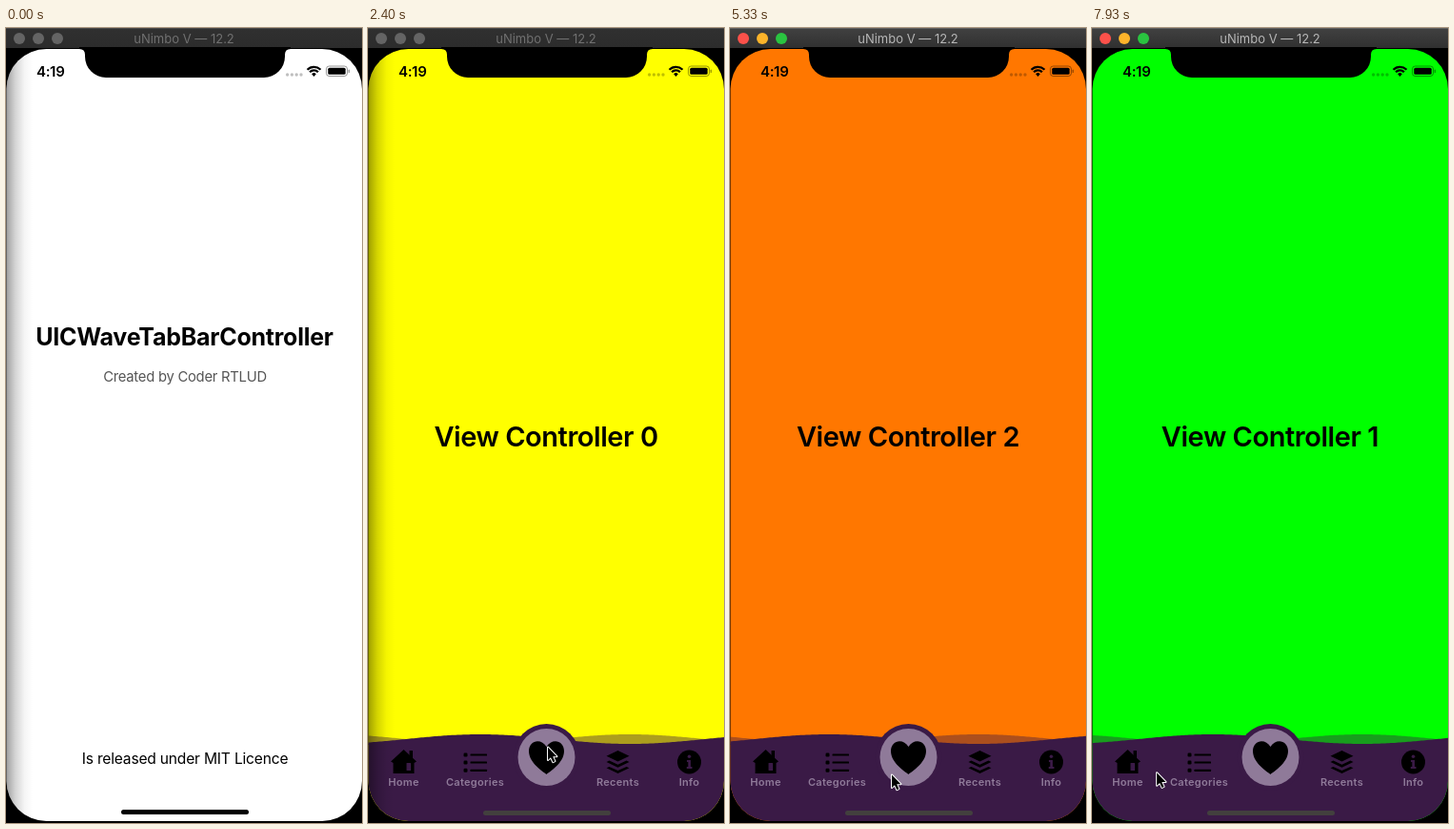
Animation of 374x834 px, one loop 8 s. Source, as an HTML page with a canvas:

```html
<!DOCTYPE html>
<html lang="en">
<head>
<meta charset="utf-8">
<title>Wave tab bar</title>
<style>
html, body { margin: 0; width: 100%; height: 100%; overflow: hidden; background: #000; }
canvas { display: block; width: 374px; height: 834px; }
</style>
</head>
<body>
<canvas id="stage"></canvas>
<script>
const W = 374, H = 834, LOOP = 8000;
const PURPLE = '#3a1a46', LILAC = '#8f7a99';
const PAGES = ['#ffff00', '#00ff00', '#ff7700', '#808080', '#8b5a2b'];
const FADE = [700, 1300], GROW = [1200, 2350], ACTIVE_AT = 2650;
// [time, page] for every tap on a tab
const TAPS = [[0, 0], [3450, 1], [4750, 2], [5800, 3], [6500, 4], [7170, 3], [7450, 2], [7700, 1]];
// [time, x, y] of the pointer tip
const POINTER = [
  [2000, 250, 840], [2400, 188, 753], [2700, 187, 754], [3330, 108, 772], [3600, 110, 774],
  [3930, 130, 774], [4500, 181, 772], [4900, 177, 777], [5330, 169, 782], [5700, 258, 780],
  [5900, 261, 779], [6400, 334, 778], [6600, 333, 779], [6930, 300, 782], [7170, 262, 781],
  [7450, 186, 778], [7700, 113, 778], [8000, 60, 780]
];

const canvas = document.getElementById('stage');
const ctx = canvas.getContext('2d');
const dpr = window.devicePixelRatio || 1;
canvas.width = W * dpr;
canvas.height = H * dpr;

const clamp = v => Math.max(0, Math.min(1, v));
const ease = v => v * v * (3 - 2 * v);
const span = (t, [a, b]) => clamp((t - a) / (b - a));

function text(str, x, y, size, weight, color, spacing = 0) {
  ctx.font = `${weight} ${size}px Inter, sans-serif`;
  ctx.letterSpacing = spacing + 'px';
  ctx.textAlign = 'center';
  ctx.textBaseline = 'alphabetic';
  ctx.fillStyle = color;
  ctx.fillText(str, x, y);
}

function disc(x, y, r, color) {
  ctx.fillStyle = color;
  ctx.beginPath();
  ctx.arc(x, y, r, 0, Math.PI * 2);
  ctx.fill();
}

function box(x, y, w, h, r, color) {
  ctx.fillStyle = color;
  ctx.beginPath();
  ctx.roundRect(x, y, w, h, r);
  ctx.fill();
}

function poly(points, color) {
  ctx.fillStyle = color;
  ctx.beginPath();
  points.forEach(([x, y]) => ctx.lineTo(x, y));
  ctx.closePath();
  ctx.fill();
}

function titleBar(active) {
  const g = ctx.createLinearGradient(0, 0, 0, 21);
  g.addColorStop(0, active ? '#414141' : '#303030');
  g.addColorStop(1, active ? '#303030' : '#2c2c2c');
  ctx.fillStyle = g;
  ctx.fillRect(0, 0, W, 21);
  ctx.fillStyle = active ? '#606060' : '#484848';
  ctx.fillRect(0, 0, W, 1);
  const lights = active ? ['#fc514a', '#fdb42a', '#2ac440'] : ['#646464', '#646464', '#646464'];
  lights.forEach((c, i) => disc(14 + 20 * i, 11, 6, c));
  text('uNimbo V — 12.2', 187, 16, 13, 400, active ? '#b6b6b6' : '#707070');
}

function splash() {
  ctx.fillStyle = '#fff';
  ctx.fillRect(0, 21, W, H);
  text('UICWaveTabBarController', 187.5, 333, 25, 700, '#000', -0.25);
  text('Created by Coder RTLUD', 188, 370.5, 14.8, 400, '#555', -0.25);
  text('Is released under MIT Licence', 188, 772, 15.6, 400, '#000', -0.2);
  box(121, 820, 134, 5, 2.5, '#000');
}

function wave(t, sign, color) {
  const amp = 5 * span(t, GROW);
  const crest = 118 - 0.112 * (t - 2400);
  ctx.fillStyle = color;
  ctx.beginPath();
  ctx.moveTo(0, 752);
  for (let x = 0; x <= W; x += 2) {
    ctx.lineTo(x, 751 - amp - sign * amp * Math.cos((x - crest) * 0.02));
  }
  ctx.lineTo(W, 752);
  ctx.fill();
}

function homeIcon() {
  poly([[37.5, 757], [51, 769.5], [48.5, 771], [48.5, 782], [26.5, 782], [26.5, 771], [24, 769.5]], '#000');
  box(43.5, 758, 3.5, 8, 0.5, '#000');
  box(40.5, 771, 4.5, 8, 0.5, PURPLE);
}

function listIcon() {
  for (const y of [762.5, 770.5, 778.8]) {
    box(100.5, y - 2, 4, 4, 1.2, '#000');
    box(107.5, y - 1.1, 17.5, 2.2, 0.5, '#000');
  }
}

function layersIcon() {
  poly([[262.5, 758], [274.5, 763.7], [262.5, 769.4], [250.5, 763.7]], '#000');
  for (const y of [770, 776.3]) {
    poly([[253.5, y - 1.4], [262.5, y + 2.8], [271.5, y - 1.4], [274.5, y],
          [262.5, y + 5.8], [250.5, y]], '#000');
  }
}

function infoIcon() {
  disc(337.5, 770, 12.5, '#000');
  disc(337.5, 764.3, 1.8, PURPLE);
  poly([[335, 768], [339, 768], [339, 775], [340.5, 775], [340.5, 777],
        [334.8, 777], [334.8, 775], [336.3, 775], [336.3, 770], [335, 770]], PURPLE);
}

function heartButton() {
  disc(187.5, 765, 35, PURPLE);
  disc(187.5, 765, 30, LILAC);
  ctx.fillStyle = '#000';
  ctx.beginPath();
  ctx.moveTo(187.5, 783);
  ctx.bezierCurveTo(184, 780, 169, 771, 169, 758.5);
  ctx.bezierCurveTo(169, 747, 182, 744.5, 187.5, 754);
  ctx.bezierCurveTo(193, 744.5, 206, 747, 206, 758.5);
  ctx.bezierCurveTo(206, 771, 191, 780, 187.5, 783);
  ctx.fill();
}

function page(index, t) {
  ctx.fillStyle = PAGES[index];
  ctx.fillRect(0, 21, W, H);
  text('View Controller ' + index, 187, 439, 29, 600, '#000', -0.45);
  wave(t, -1, 'rgba(58,26,70,0.42)');
  wave(t, 1, PURPLE);
  ctx.fillStyle = PURPLE;
  ctx.fillRect(0, 751, W, 90);
  homeIcon();
  listIcon();
  layersIcon();
  infoIcon();
  heartButton();
  const tabs = [['Home', 37.5], ['Categories', 112.5], ['Recents', 262.5], ['Info', 337.5]];
  for (const [name, x] of tabs) text(name, x, 795, 11, 600, LILAC, 0.3);
  box(121, 821, 134, 5, 2.5, '#42403e');
}

function statusBar() {
  text('4:19', 46.7, 50.5, 15, 600, '#000', -0.3);
  for (let i = 0; i < 4; i++) disc(295.6 + 4.8 * i, 49, 1.7, 'rgba(0,0,0,0.25)');
  ctx.strokeStyle = '#000';
  ctx.lineWidth = 2.3;
  for (const r of [9.7, 6.1]) {
    ctx.beginPath();
    ctx.arc(323.5, 50.5, r, -Math.PI * 0.755, -Math.PI * 0.245);
    ctx.stroke();
  }
  ctx.fillStyle = '#000';
  ctx.beginPath();
  ctx.moveTo(323.5, 51);
  ctx.arc(323.5, 50.5, 3.3, -Math.PI * 0.755, -Math.PI * 0.245);
  ctx.fill();
  ctx.strokeStyle = 'rgba(0,0,0,0.4)';
  ctx.lineWidth = 1;
  ctx.beginPath();
  ctx.roundRect(336.5, 40, 22, 10.5, 3);
  ctx.stroke();
  box(338.3, 41.8, 18.4, 6.9, 1.5, '#000');
  box(359.6, 43.5, 1.4, 3.6, 0.7, 'rgba(0,0,0,0.4)');
}

function notch() {
  ctx.fillStyle = '#000';
  ctx.beginPath();
  ctx.moveTo(77, 20);
  ctx.lineTo(77, 22);
  ctx.quadraticCurveTo(83, 22, 83, 28);
  ctx.arcTo(83, 52, 107, 52, 22);
  ctx.lineTo(269, 52);
  ctx.arcTo(293, 52, 293, 28, 22);
  ctx.lineTo(293, 28);
  ctx.quadraticCurveTo(293, 22, 299, 22);
  ctx.lineTo(299, 20);
  ctx.fill();
}

function edgeShadow() {
  const g = ctx.createLinearGradient(0, 0, 28, 0);
  g.addColorStop(0, 'rgba(0,0,0,0.38)');
  g.addColorStop(0.35, 'rgba(0,0,0,0.17)');
  g.addColorStop(0.7, 'rgba(0,0,0,0.04)');
  g.addColorStop(1, 'rgba(0,0,0,0)');
  ctx.fillStyle = g;
  ctx.fillRect(0, 21, 28, H);
}

function pointer(t) {
  if (t < POINTER[0][0]) return;
  let i = 1;
  while (i < POINTER.length - 1 && POINTER[i][0] < t) i++;
  const [t0, x0, y0] = POINTER[i - 1], [t1, x1, y1] = POINTER[i];
  const k = ease(span(t, [t0, t1]));
  ctx.save();
  ctx.translate(x0 + (x1 - x0) * k, y0 + (y1 - y0) * k);
  ctx.lineJoin = 'round';
  ctx.strokeStyle = '#fff';
  ctx.lineWidth = 2;
  const arrow = new Path2D('M1 1.5V15L4 12.2L6.4 17.2L8.5 16.2L6.2 11.3H10.4Z');
  ctx.stroke(arrow);
  ctx.fillStyle = '#000';
  ctx.fill(arrow);
  ctx.restore();
}

function draw(t) {
  const active = t >= ACTIVE_AT;
  const shown = ease(span(t, FADE));
  const index = TAPS.filter(([at]) => at <= t).pop()[1];
  ctx.setTransform(dpr, 0, 0, dpr, 0, 0);
  ctx.fillStyle = '#000';
  ctx.fillRect(0, 0, W, H);
  titleBar(active);

  ctx.save();
  ctx.beginPath();
  ctx.roundRect(0.5, 22, 373.5, 810, 42);
  ctx.clip();
  if (shown > 0) page(index, t);
  if (shown < 1) {
    ctx.globalAlpha = 1 - shown;
    splash();
    ctx.globalAlpha = 1;
  }
  statusBar();
  if (!active) edgeShadow();
  ctx.restore();

  notch();
  pointer(t);
}

function tick() {
  draw(performance.now() % LOOP);
  requestAnimationFrame(tick);
}
tick();
</script>
</body>
</html>
```
